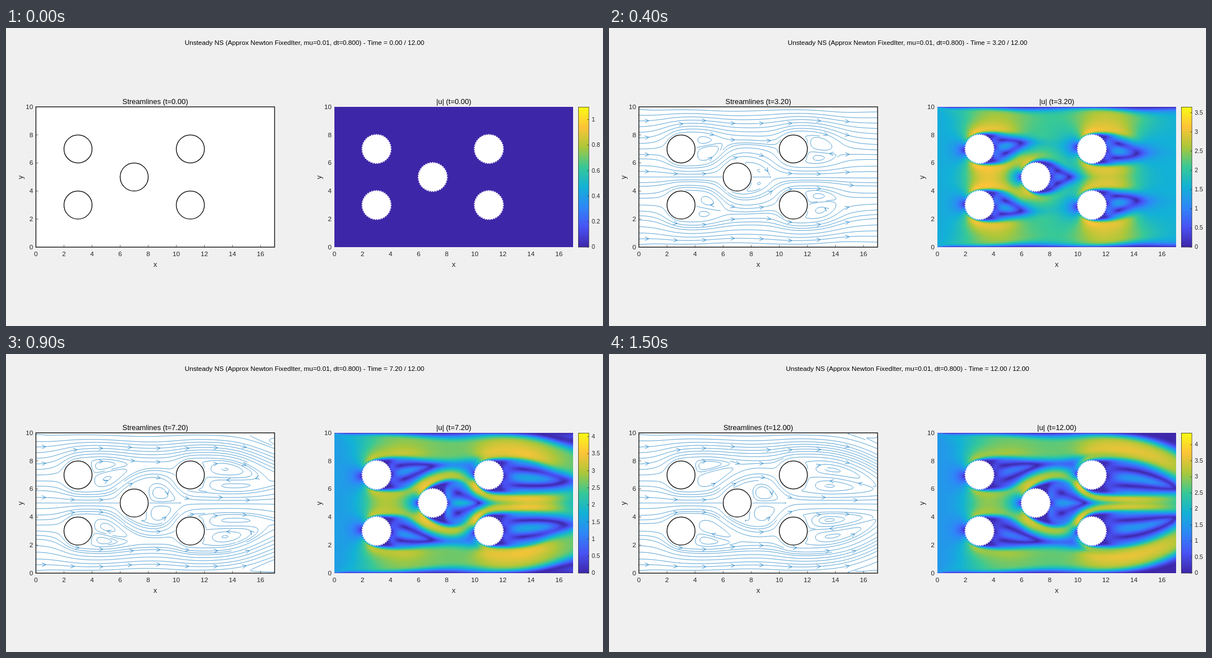
Animation, 1058 px wide and 529 px high, one loop 1600 ms. Source, as an HTML page with a canvas:

```html
<!DOCTYPE html>
<html lang="en">
<head>
<meta charset="utf-8">
<title>Unsteady flow past five cylinders</title>
<style>
  html, body { margin: 0; height: 100%; overflow: hidden; background: #f0f0f0; }
  canvas { display: block; }
</style>
</head>
<body>
<canvas id="stage" width="1058" height="529"></canvas>
<script>
const FRAMES = 16, FRAME_MS = 100, DT = 0.8, VISCOSITY = 0.01, INFLOW = 1.5;
const DISCS = [[3, 3], [3, 7], [7, 5], [11, 3], [11, 7]];
const clamp = (x, lo, hi) => x < lo ? lo : x > hi ? hi : x;

function wallDistance(x, y) {
  let d = 99;
  for (const [cx, cy] of DISCS) d = Math.min(d, Math.hypot(x - cx, y - cy) - 1);
  return d;
}

// ---- Flow solver: staggered grid on the lower half, mirrored about y = 5 ----
const NX = 170, NY = 50, CELL = 0.1, H = NY + 5, SIZE = (NX + 5) * H;
const PSEUDO = 0.01, ITERATIONS = 120;
const at = (i, j) => (i + 2) * H + j + 2;
const grid = () => new Float64Array(SIZE);
const u = grid(), v = grid(), openU = grid(), openV = grid();
let rateU = grid(), rateV = grid(), lastRateU = grid(), lastRateV = grid();

function linear(a, x, y) {
  const i = Math.floor(x), j = Math.floor(y), f = x - i, g = y - j, k = at(i, j);
  return (1 - f) * ((1 - g) * a[k] + g * a[k + 1]) + f * ((1 - g) * a[k + H] + g * a[k + H + 1]);
}

// Open fraction of every cell face
for (let i = 0; i <= NX; i++) for (let j = 0; j <= NY; j++) {
  const open = (x, y) => clamp(0.5 + wallDistance(x * CELL, y * CELL) / CELL, 0, 1);
  if (j < NY) openU[at(i, j)] = open(i, j + 0.5);
  if (i < NX && j > 0 && j < NY) openV[at(i, j)] = open(i + 0.5, j);
}

// Banded Cholesky factor of the pressure matrix
const N = NX * NY, BAND = NY + 1, L = new Float64Array(N * BAND);
for (let i = 0; i < NX; i++) for (let j = 0; j < NY; j++) {
  const n = (i * NY + j) * BAND, k = at(i, j), west = i ? openU[k] : 0;
  L[n] = west + openU[k + H] + openV[k] + openV[k + 1] + 1e-6;
  if (j) L[n + 1] = -openV[k];
  if (i) L[n + NY] = -west;
}
for (let n = 0; n < N; n++) {
  const reach = Math.min(NY, n), rn = n * BAND;
  for (let d = reach; d >= 0; d--) {
    const rm = (n - d) * BAND;
    let s = L[rn + d];
    for (let e = 1; d + e <= reach; e++) s -= L[rn + d + e] * L[rm + e];
    L[rn + d] = d ? s / L[rm] : Math.sqrt(Math.max(s, 1e-9));
  }
}

function solve(x) {
  for (let n = 0; n < N; n++) {
    const reach = Math.min(NY, n), r = n * BAND;
    let s = x[n];
    for (let d = 1; d <= reach; d++) s -= L[r + d] * x[n - d];
    x[n] = s / L[r];
  }
  for (let n = N - 1; n >= 0; n--) {
    const reach = Math.min(NY, n), r = n * BAND, s = x[n] /= L[r];
    for (let d = 1; d <= reach; d++) x[n - d] -= L[r + d] * s;
  }
}

function applyBoundaries() {
  for (let j = 0; j < NY; j++) u[at(0, j)] = INFLOW;
  for (let j = 0; j <= NY; j++) for (let k = 1; k <= 3; k++) {
    if (k < 3) {
      u[at(-k, j)] = u[at(0, j)];
      u[at(NX + k, j)] = u[at(NX, j)];
      v[at(-k, j)] = 0;
    }
    v[at(NX - 1 + k, j)] = v[at(NX - 1, j)];
  }
  for (let i = -2; i <= NX + 2; i++) {
    v[at(i, 0)] = v[at(i, NY)] = 0;
    for (let k = 1; k <= 2; k++) {
      u[at(i, -k)] = -u[at(i, k - 1)];
      u[at(i, NY - 1 + k)] = u[at(i, NY - k)];
      v[at(i, -k)] = v[at(i, k)];
      v[at(i, NY + k)] = -v[at(i, NY - k)];
    }
  }
}

// Third-order upwind face value with a limiter
function upwind(l, c, r) {
  const d = c - l, e = r - c;
  if (d * e <= 0) return c;
  const m = Math.min(Math.abs(d), Math.abs(e), Math.abs(d + 2 * e) / 6);
  return d > 0 ? c + m : c - m;
}

const face = (a, k, s, q) =>
  q > 0 ? upwind(a[k - s], a[k], a[k + s]) : upwind(a[k + 2 * s], a[k + s], a[k]);

// Rate of component a (along stride s); b is the other component (along stride t)
function computeRate(rate, a, b, s, t, old, open) {
  const diffuse = VISCOSITY / CELL ** 2;
  for (let k = at(0, 0); k <= at(NX, NY - 1); k++) {
    if (open[k] <= 0.5) continue;
    const c = a[k];
    const ahead = 0.5 * (c + a[k + s]), behind = 0.5 * (c + a[k - s]);
    const above = 0.5 * (b[k + t - s] + b[k + t]), below = 0.5 * (b[k - s] + b[k]);
    const flux = ahead * (face(a, k, s, ahead) - c) - behind * (face(a, k - s, s, behind) - c)
               + above * (face(a, k, t, above) - c) - below * (face(a, k - t, t, below) - c);
    const lap = a[k - 1] + a[k + 1] + a[k - H] + a[k + H] - 4 * c;
    rate[k] = diffuse * lap - flux / CELL + (old[k] - c) / DT;
  }
}

function applyRate(a, rate, lastRate, open) {
  for (let k = 0; k < SIZE; k++)
    a[k] = open[k] > 0.5 ? a[k] + PSEUDO * (1.5 * rate[k] - 0.5 * lastRate[k]) : 0;
}

const pressure = new Float64Array(N);
function project() {
  for (let i = 0; i < NX; i++) for (let j = 0; j < NY; j++) {
    const k = at(i, j);
    pressure[i * NY + j] = openU[k] * u[k] - openU[k + H] * u[k + H]
                         + openV[k] * v[k] - openV[k + 1] * v[k + 1];
  }
  solve(pressure);
  for (let i = 0; i <= NX; i++) for (let j = 0; j < NY; j++) {
    const k = at(i, j), n = i * NY + j, p = i < NX ? pressure[n] : 0;
    if (i && openU[k] > 0) u[k] -= p - pressure[n - NY];
    if (j && i < NX && openV[k] > 0) v[k] -= p - pressure[n - 1];
  }
}

// One backward Euler step, relaxed in pseudo time from an extrapolated guess
const flows = [{ u: u.slice(), v: v.slice() }];
function advance() {
  const old = flows[flows.length - 1];
  if (flows.length > 2) {
    const older = flows[flows.length - 2];
    for (let k = 0; k < SIZE; k++) {
      u[k] += old.u[k] - older.u[k];
      v[k] += old.v[k] - older.v[k];
    }
  }
  for (let n = 0; n < ITERATIONS; n++) {
    applyBoundaries();
    computeRate(rateU, u, v, H, 1, old.u, openU);
    computeRate(rateV, v, u, 1, H, old.v, openV);
    applyRate(u, rateU, lastRateU, openU);
    applyRate(v, rateV, lastRateV, openV);
    [rateU, lastRateU, rateV, lastRateV] = [lastRateU, rateU, lastRateV, rateV];
    applyBoundaries();
    project();
  }
  applyBoundaries();
  flows.push({ u: u.slice(), v: v.slice() });
}
while (flows.length < FRAMES) advance();

// Velocity at a point of the whole channel
const speed = { x: 0, y: 0 };
function sample(flow, x, y) {
  const upper = y > 5, X = x / CELL, Y = (upper ? 10 - y : y) / CELL;
  speed.x = linear(flow.u, X, Y - 0.5);
  speed.y = linear(flow.v, X - 0.5, Y) * (upper ? -1 : 1);
  return Math.hypot(speed.x, speed.y);
}

// ---- Drawing ----
const ctx = document.getElementById('stage').getContext('2d');
const LEFT = 53, RIGHT = 582, TOP = 140, BOTTOM = 389, WIDTH = 423, HEIGHT = 249;
const UNIT = WIDTH / 17, UNIT_Y = HEIGHT / 10;
const SCALE_MAX = [1.1, 3.65, 3.71, 3.67, 3.65, 3.74, 3.84, 3.92, 3.99, 4.11, 4.25, 4.35, 4.38, 4.38, 4.37, 4.37];
const PARULA = [
  [62, 38, 168], [72, 82, 244], [46, 135, 247], [18, 177, 214],
  [55, 200, 151], [171, 199, 57], [254, 195, 56], [249, 251, 21]
];

function parula(t) {
  const s = clamp(t, 0, 1) * 7, i = Math.min(6, Math.floor(s));
  return PARULA[i].map((c, n) => c + (PARULA[i + 1][n] - c) * (s - i));
}
const PALETTE = Array.from({ length: 256 }, (_, i) => parula(i / 255));

function text(s, x, y, size = 11.73, align = 'center', color = '#262626') {
  ctx.font = `${size}px "Liberation Sans", Arial, sans-serif`;
  ctx.textAlign = align;
  ctx.textBaseline = 'middle';
  ctx.fillStyle = color;
  ctx.fillText(s, x, y);
}

function line(x1, y1, x2, y2) {
  ctx.beginPath();
  ctx.moveTo(x1, y1);
  ctx.lineTo(x2, y2);
  ctx.stroke();
}

function drawAxes(x0, title) {
  for (let x = 0; x <= 16; x += 2) text(x, x0 + x * UNIT, 402);
  for (let y = 0; y <= 10; y += 2) text(y, x0 - 5, BOTTOM - y * UNIT_Y + 0.5, 11.73, 'right');
  text('x', x0 + WIDTH / 2, 420, 12.9);
  ctx.save();
  ctx.translate(x0 - 27, 265);
  ctx.rotate(-Math.PI / 2);
  text('y', 0, 0, 12.9);
  ctx.restore();
  text(title, x0 + WIDTH / 2, 131, 12.9, 'center', '#000');
}

function discPath(x0, [cx, cy], radius) {
  ctx.beginPath();
  ctx.arc(x0 + cx * UNIT, BOTTOM - cy * UNIT_Y, radius, 0, 2 * Math.PI);
}

// Evenly spaced streamlines; cells already crossed stop later lines
function drawStreamlines(flow) {
  const CELLS = 25, FINE = 100, STEP = 0.02, HEAD = 0.135;
  const seeded = new Uint8Array(CELLS * CELLS), crossed = new Uint8Array(FINE * FINE);
  const arrowed = new Uint8Array(CELLS * CELLS);
  const cellOf = (x, y, n) => Math.floor(y / 10 * n) * n + Math.floor(x / 17 * n);
  const px = x => LEFT + x * UNIT, py = y => BOTTOM - y * UNIT_Y;

  function arrow(x, y, dx, dy) {
    const barb = s => [px(x - HEAD * (2 * dx + s * dy)), py(y - HEAD * (2 * dy - s * dx))];
    ctx.moveTo(...barb(1));
    ctx.lineTo(px(x), py(y));
    ctx.lineTo(...barb(-1));
    ctx.moveTo(px(x), py(y));
  }

  function trace(x, y, sign) {
    let last = cellOf(x, y, FINE), dx = 0, dy = 0;
    ctx.moveTo(px(x), py(y));
    for (let n = 0; n < 6000; n++) {
      if (!(x >= 0 && x < 17 && y >= 0 && y < 10) || wallDistance(x, y) < 0.1) return;
      const coarse = cellOf(x, y, CELLS), fine = cellOf(x, y, FINE);
      seeded[coarse] = 1;
      if (crossed[fine] && fine !== last) return;
      crossed[last = fine] = 1;
      if (n) ctx.lineTo(px(x), py(y));
      const row = Math.floor(coarse / CELLS), col = coarse % CELLS;
      if (n && sign > 0 && row % 3 === 1 && col % 3 === 1 && !arrowed[coarse]) {
        arrowed[coarse] = 1;
        arrow(x, y, dx, dy);
      }
      let s = sample(flow, x, y);
      if (s < 1e-4) return;
      const k = sign * STEP / 2 / s;
      s = sample(flow, clamp(x + k * speed.x, 0, 17), clamp(y + k * speed.y, 0, 10));
      if (s < 1e-4) return;
      dx = sign * speed.x / s;
      dy = sign * speed.y / s;
      x += STEP * dx;
      y += STEP * dy;
    }
  }

  ctx.strokeStyle = '#0072bd';
  ctx.lineWidth = 0.75;
  ctx.beginPath();
  for (let r = 0; r < CELLS; r++) for (let c = 0; c < CELLS; c++) {
    if (seeded[r * CELLS + c]) continue;
    seeded[r * CELLS + c] = 1;
    const x = (c + 0.5) * 17 / CELLS, y = (r + 0.5) * 10 / CELLS;
    trace(x, y, 1);
    trace(x, y, -1);
  }
  ctx.stroke();
}

function drawSpeed(flow, max) {
  const image = ctx.createImageData(WIDTH, HEIGHT);
  for (let row = 0, k = 0; row < HEIGHT; row++) for (let col = 0; col < WIDTH; col++, k += 4) {
    const s = sample(flow, (col + 0.5) / UNIT, 10 - (row + 0.5) / UNIT_Y);
    const color = PALETTE[Math.min(255, Math.floor(s / max * 256))];
    image.data[k] = color[0];
    image.data[k + 1] = color[1];
    image.data[k + 2] = color[2];
    image.data[k + 3] = 255;
  }
  ctx.putImageData(image, RIGHT, TOP);
  ctx.fillStyle = ctx.strokeStyle = '#fff';
  ctx.lineWidth = 1.5;
  for (const disc of DISCS) {
    discPath(RIGHT, disc, 25.3);
    ctx.fill();
    ctx.setLineDash([2.2, 1.9]);
    discPath(RIGHT, disc, 25.7);
    ctx.stroke();
    ctx.setLineDash([]);
  }
}

function drawColorbar(max) {
  const ramp = ctx.createLinearGradient(0, BOTTOM, 0, TOP);
  PARULA.forEach((c, i) => ramp.addColorStop(i / 7, `rgb(${c})`));
  ctx.fillStyle = ramp;
  ctx.fillRect(1014, TOP, 19, HEIGHT);
  ctx.strokeStyle = '#262626';
  ctx.lineWidth = 0.7;
  ctx.strokeRect(1014.5, TOP + 0.5, 18.5, HEIGHT - 0.5);
  const step = max < 2 ? 0.2 : 0.5;
  for (let n = 0; n * step <= max; n++) {
    const y = BOTTOM - n * step / max * HEIGHT;
    line(1030, y, 1033, y);
    text(+(n * step).toFixed(1), 1038, y + 0.5, 10.56, 'left');
  }
}

function draw(k) {
  const time = (k * DT).toFixed(2), flow = flows[k];
  ctx.fillStyle = '#f0f0f0';
  ctx.fillRect(0, 0, 1058, 529);
  text(`Unsteady NS (Approx Newton FixedIter, mu=0.01, dt=0.800) - Time = ${time} / 12.00`,
    529, 27, 11.73, 'center', '#000');

  ctx.fillStyle = '#fff';
  ctx.fillRect(LEFT, TOP, WIDTH, HEIGHT);
  drawStreamlines(flow);
  ctx.strokeStyle = '#262626';
  ctx.lineWidth = 0.7;
  for (let n = 2; n <= 16; n += 2) {
    line(LEFT + n * UNIT, BOTTOM, LEFT + n * UNIT, BOTTOM - 4);
    if (n < 10) line(LEFT, BOTTOM - n * UNIT_Y, LEFT + 4, BOTTOM - n * UNIT_Y);
  }
  ctx.strokeStyle = '#000';
  ctx.lineWidth = 1.3;
  ctx.strokeRect(LEFT, TOP, WIDTH, HEIGHT);
  for (const disc of DISCS) {
    discPath(LEFT, disc, UNIT);
    ctx.stroke();
  }
  drawAxes(LEFT, `Streamlines (t=${time})`);

  drawSpeed(flow, SCALE_MAX[k]);
  drawAxes(RIGHT, `|u| (t=${time})`);
  drawColorbar(SCALE_MAX[k]);
}

const start = performance.now();
let shown = -1;
function tick(now) {
  const k = Math.floor(Math.max(0, now - start) / FRAME_MS) % FRAMES;
  if (k !== shown) draw(shown = k);
  requestAnimationFrame(tick);
}
draw(shown = 0);
requestAnimationFrame(tick);
</script>
</body>
</html>
```
